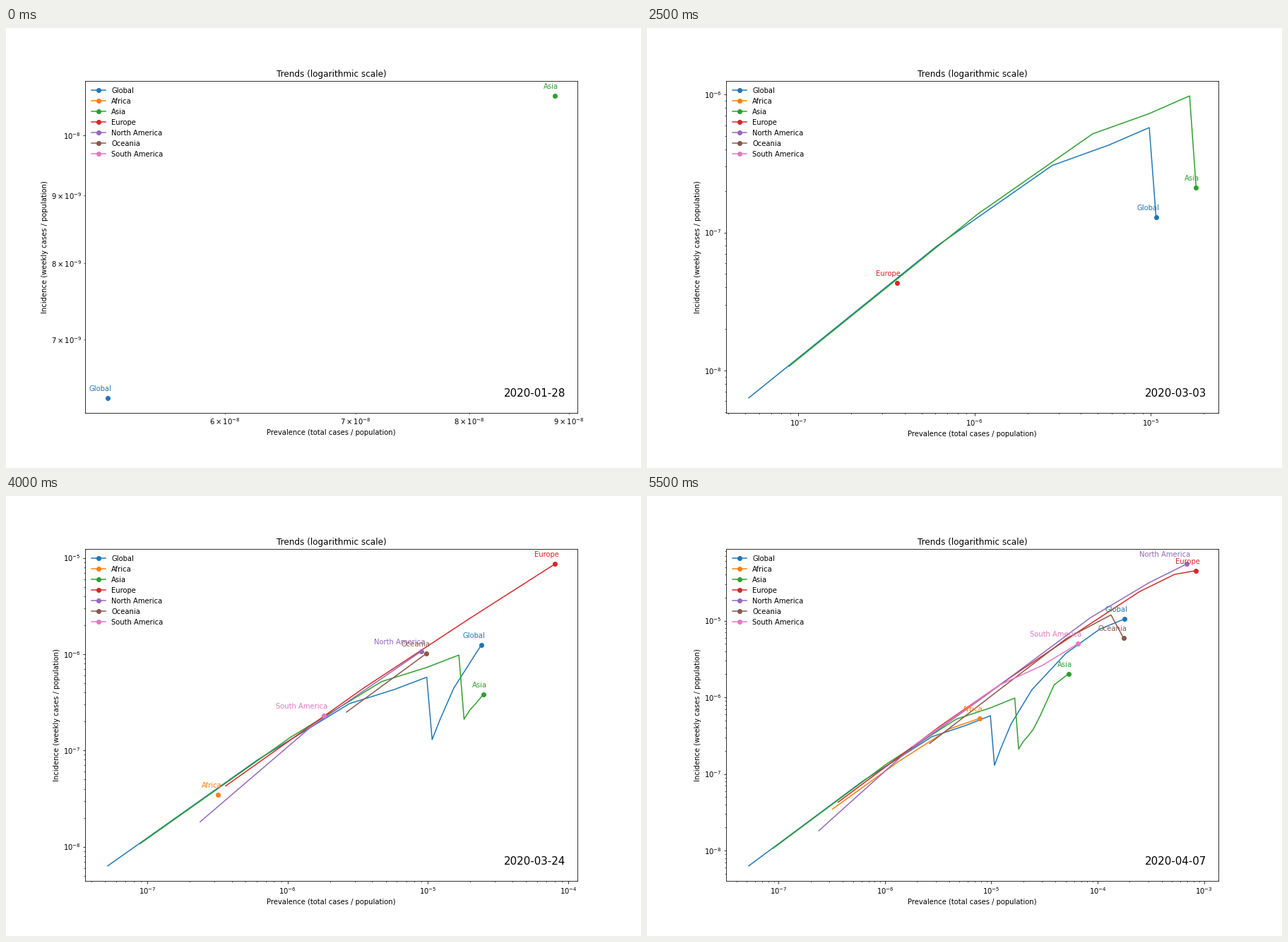
Write a matplotlib script that moves like this. It is 899 px wide and 623 px high and loops after 7.5 s.

```python
import matplotlib.pyplot as plt
import numpy as np
from matplotlib.animation import FuncAnimation
from matplotlib.lines import Line2D

W, H, DPI = 899, 623, 72
WEEKS = 12
FRAMES, INTERVAL = 15, 500

# Cumulative cases per million people, one value a week up to the last week;
# the first value only feeds the first weekly difference.
TOTALS = {
    "Global": [0.008, 0.05226, 0.6128, 2.756, 5.765, 9.797, 10.703, 12.16,
               15.27, 24.04, 50.24, 104.4, 177.76],
    "Africa": [0.0765, 0.32, 1.335, 4.05, 7.78],
    "Asia": [0.01355, 0.08854, 1.038, 4.668, 9.75, 16.594, 18.07, 19.92,
             22.1, 24.77, 28.79, 38.95, 53.1],
    "Europe": [0.062, 0.362, 3.42, 19.96, 80.5, 248, 529, 843.8],
    "North America": [0.111, 0.238, 1.467, 8.96, 85.3, 304, 689],
    "Oceania": [0.876, 2.627, 9.72, 50.38, 133.54, 175.07],
    "South America": [0.22, 1.816, 11.95, 30.2, 65.25],
}
COLORS = {name: f"C{i}" for i, name in enumerate(TOTALS)}


def trend(name, week):
    """Prevalence and mean daily incidence up to the given week."""
    total = np.array(TOTALS[name]) * 1e-6
    x, y = total[1:], np.diff(total) / 7
    shown = max(0, week + 1 - (WEEKS - len(x)))
    return x[:shown], y[:shown]


def day(week):
    # The date stops one week before the data does.
    return str(np.datetime64("2020-01-28") + 7 * min(week, WEEKS - 2))


fig, ax = plt.subplots(figsize=((W + 1e-6) / DPI, (H + 1e-6) / DPI), dpi=DPI)
fig.subplots_adjust(left=0.125, right=0.9, bottom=0.125, top=0.88)
handles = [Line2D([], [], color=c, marker="o", label=n)
           for n, c in COLORS.items()]


def draw(frame):
    week = min(frame, WEEKS - 1)
    ax.clear()
    ax.set(xscale="log", yscale="log", title="Trends (logarithmic scale)",
           xlabel="Prevalence (total cases / population)",
           ylabel="Incidence (weekly cases / population)")
    for name, color in COLORS.items():
        x, y = trend(name, week)
        if len(x) == 0:
            continue
        ax.plot(x, y, color=color)
        ax.plot(x[-1:], y[-1:], "o", color=color)
        ax.annotate(name, (x[-1], y[-1]), xytext=(5, 10), ha="right",
                    textcoords="offset points", color=color)
    ax.text(0.85, 0.05, day(week), transform=ax.transAxes, fontsize=15)
    ax.legend(handles=handles, loc="upper left", frameon=False)


anim = FuncAnimation(fig, draw, frames=FRAMES, interval=INTERVAL,
                     repeat=True, repeat_delay=0)
plt.show()
```
